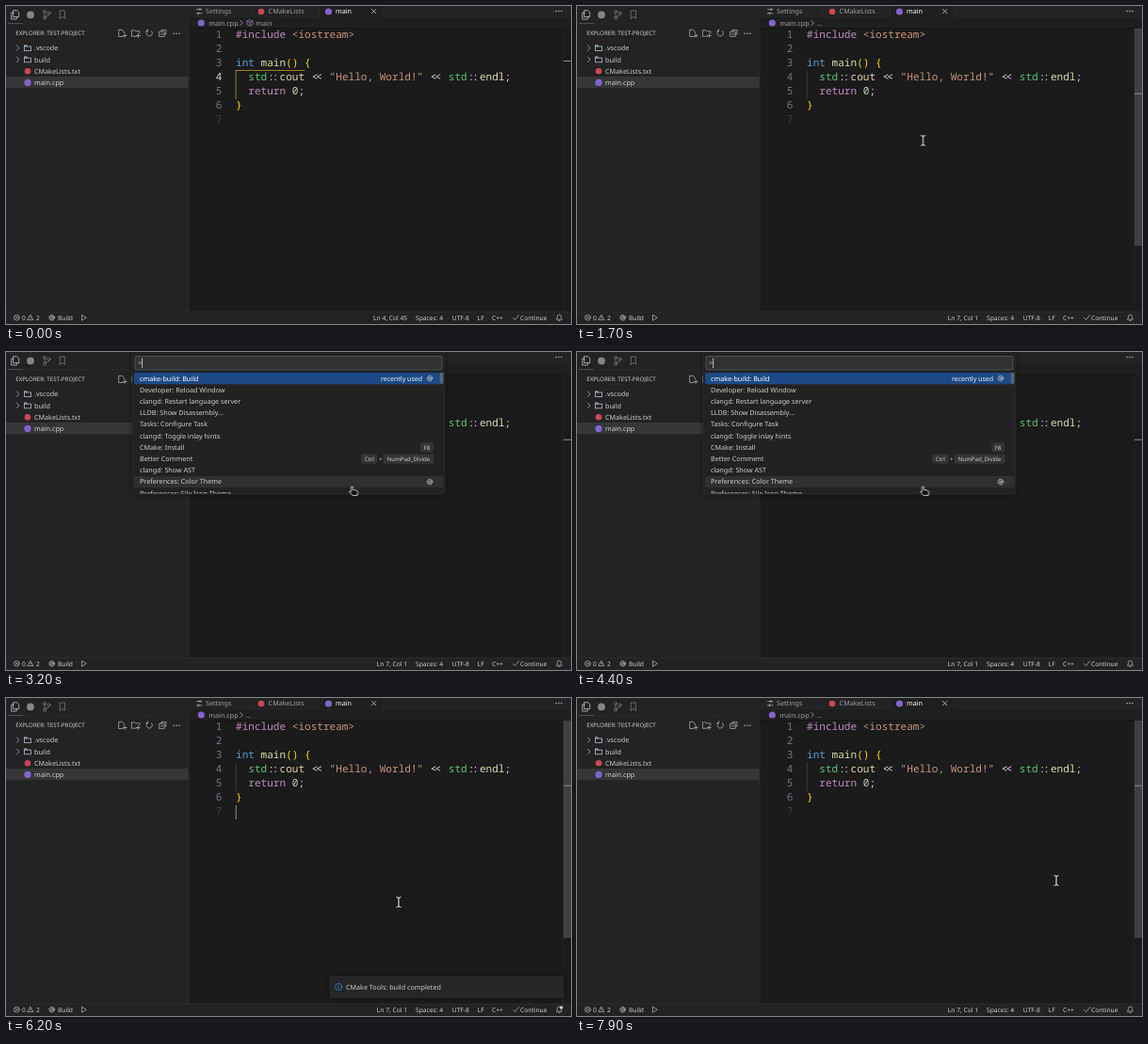
An HTML page that plays this animation: 600x338 px, repeating every 8000 ms.

```html
<!DOCTYPE html>
<html lang="en">
<head>
<meta charset="utf-8">
<title>Code editor</title>
<style>
html, body { margin: 0; width: 100%; height: 100%; overflow: hidden; background: #1b1b1b; }
svg { display: block; width: 100%; height: 100%; }
text { font: 7.2px "Noto Sans", sans-serif; fill: #ccc; text-rendering: geometricPrecision; white-space: pre; }
.status text { font-size: 6.66px; }
.dim, .dim text { fill: #9d9d9d; }
.code text { font: 11.07px "Noto Sans Mono", monospace; fill: #d4d4d4; font-variant-ligatures: none; }
.code .num { fill: #6e7681; }
.code .last { fill: #3c3e41; }
.code .now { fill: #d8d8d8; }
.key { fill: #c586c0; } .str { fill: #ce9178; } .type { fill: #569cd6; } .fn { fill: #dcdcaa; }
.brace { fill: #ffd700; } .ns { fill: #55c46c; } .var { fill: #e6cfa8; } .lit { fill: #b5cea8; }
.op { fill: #e4e4e4; font-weight: 500; }
.line { fill: none; stroke: #c5c5c5; stroke-width: .65; stroke-linecap: round; stroke-linejoin: round; }
.key-cap { fill: #343434; stroke: #3f3f3f; stroke-width: .5; }
.key-text { font-size: 6.1px; }

/* One loop is 8 s, so 1.25% is one 100 ms tick. */
.anim { animation: 8s step-end infinite; }
.before { animation-name: before; }
.after { animation-name: after; }
.caret-end { animation-name: caret-end; }
.caret-new { animation-name: caret-new; }
.caret-input { animation-name: caret-input; }
.palette { animation-name: palette; }
.slider { animation-name: slider; }
.toast { animation-name: toast; }
.tools { animation-name: tools; }
.hover { animation-name: hover; }
.pointer { animation-name: move; }
.beam { animation-name: beam; }
.arrow { animation-name: arrow; }
.hand { animation-name: hand; }

@keyframes before { 0% { opacity: 1 } 15%, 100% { opacity: 0 } }
@keyframes after { 0% { opacity: 0 } 15%, 100% { opacity: 1 } }
@keyframes caret-end { 0% { opacity: 0 } 5% { opacity: 1 } 11.25%, 100% { opacity: 0 } }
@keyframes caret-new {
  0%, 21.25%, 68.75%, 81.25%, 93.75%, 100% { opacity: 0 }
  15%, 62.5%, 75%, 87.5% { opacity: 1 }
}
@keyframes caret-input {
  0%, 33.75%, 47.5%, 100% { opacity: 0 }
  26.25%, 40%, 53.75% { opacity: 1 }
}
@keyframes palette { 0%, 62.5%, 100% { opacity: 0 } 25% { opacity: 1 } }
@keyframes slider {
  0% { opacity: 0 }
  3.75% { opacity: 1 }
  27.5% { opacity: 1; animation-timing-function: steps(8) }
  37.5% { opacity: 0 }
  63.75% { opacity: 0; animation-timing-function: steps(2) }
  66.25% { opacity: 1 }
  83.75% { opacity: 1; animation-timing-function: steps(8) }
  93.75% { opacity: 0 }
  95%, 100% { opacity: 1 }
}
@keyframes toast {
  0% { opacity: 0 }
  65% { opacity: 0; animation-timing-function: steps(2) }
  67.5% { opacity: 1 }
  93.75%, 100% { opacity: 0 }
}
@keyframes tools { 0%, 100% { opacity: 0 } 81.25% { opacity: 1 } }
@keyframes hover { 0%, 100% { opacity: 0 } 86.25% { opacity: 1 } }
@keyframes move {
  0% { transform: translate(480px, 330px) }
  1.25% { transform: translate(480px, 330px); animation-timing-function: steps(8) }
  11.25% { transform: translate(367.5px, 143px) }
  73.75% { transform: translate(367.5px, 143px); animation-timing-function: steps(3) }
  77.5% { transform: translate(417px, 217px); animation-timing-function: steps(3) }
  81.25% { transform: translate(505px, 292px); animation-timing-function: steps(3) }
  85% { transform: translate(580px, 305px) }
  86.25% { transform: translate(582px, 306px) }
  92.5% { transform: translate(582px, 306px); animation-timing-function: steps(5) }
  98.75%, 100% { transform: translate(509px, 194px) }
}
@keyframes beam {
  0%, 25%, 81.25% { opacity: 0 }
  1.25%, 62.5%, 93.75%, 100% { opacity: 1 }
}
@keyframes arrow { 0%, 86.25%, 100% { opacity: 0 } 81.25% { opacity: 1 } }
@keyframes hand { 0%, 62.5%, 93.75%, 100% { opacity: 0 } 25%, 86.25% { opacity: 1 } }
</style>
</head>
<body>
<svg viewBox="0 0 600 338">
  <defs>
    <g id="gear" class="line">
      <circle r="2.3"/><circle r=".9"/>
      <circle r="3" stroke-width=".9" stroke-dasharray="1.1 1.256" stroke-linecap="butt"/>
    </g>
    <path id="chevron" class="line" d="M-1.3-2.6 1.3 0-1.3 2.6"/>
    <path id="close" class="line" style="stroke-width:.8" d="M-2.2-2.2 2.2 2.2M2.2-2.2-2.2 2.2"/>
    <g id="dots" fill="#c5c5c5"><circle cx="-2.9" r=".7"/><circle r=".7"/><circle cx="2.9" r=".7"/></g>
    <path id="folder" fill="#90a0a8" fill-rule="evenodd" d="M-4-3.3h3l1 1.1h4v5.6h-8zM-3-1.2v3.6h6v-3.6z"/>
    <circle id="build-logo" r="3.3" fill="#cf4550"/>
    <circle id="lang-logo" r="3.6" fill="#8462cf"/>
    <filter id="shadow" x="-10%" y="-30%" width="120%" height="160%">
      <feDropShadow dx="0" dy="0" stdDeviation="2.2" flood-color="#000" flood-opacity=".55"/>
    </filter>
    <clipPath id="list-clip"><path d="M134 21h332v129.5H134z"/></clipPath>
  </defs>

  <!-- Side bar -->
  <path fill="#232324" d="M0 0h194v325H0z"/>
  <path fill="#303031" d="M0 18.7h194v.6H0zM193.7 0h.7v325h-.7z"/>
  <path fill="#363638" d="M0 75.1h193.7v12.2H0z"/>
  <path fill="#5c6670" d="M2 18.2h16v.6H2z"/>
  <g class="line">
    <path stroke="#e0e0e0" d="M8 4.7h3.6l2.1 2.1v4.8H8zM8 7H5.7v7h5.6v-2.3"/>
    <g stroke="#8a8a8a">
      <circle cx="41" cy="6" r="1.5"/><circle cx="41" cy="12.8" r="1.5"/><circle cx="45.5" cy="7.6" r="1.5"/>
      <path d="M41 7.5v3.8M45.5 9.1q0 2-4.3 2M57.6 5h4.8v8.4L60 11.2l-2.4 2.2z"/>
    </g>
    <path d="M124.2 32.5h-4.5V25.3h3.6l2 2v1.4M126.2 29.5v4M124.2 31.5h4"/>
    <path d="M138.4 32.2h-5V25.8h3l1 1h4.5v2M140.4 29.5v4M138.4 31.5h4"/>
    <path d="M154.6 26.7a3.2 3.2 0 1 1-4.2-.5M150.5 24.8v1.9h-1.9"/>
    <path d="M165 27v-1.6h5V30h-1.6M163 27.2h5.2v5.2H163zM164.4 29.8h2.4"/>
  </g>
  <circle cx="26" cy="9.4" r="3.9" fill="#868686"/>
  <use href="#dots" x="181" y="29.2"/>
  <text x="10.2" y="31.3" style="font-size:6.2px">EXPLORER: TEST-PROJECT</text>
  <use href="#chevron" x="12.7" y="44.6"/>
  <use href="#chevron" x="12.7" y="56.9"/>
  <use href="#folder" x="23" y="44.6"/>
  <use href="#folder" x="23" y="56.9"/>
  <use href="#build-logo" x="23" y="69.2"/>
  <use href="#lang-logo" x="23" y="81.4"/>
  <text x="30" y="47.2">.vscode</text>
  <text x="30" y="59.5">build</text>
  <text x="30" y="71.8">CMakeLists.txt</text>
  <text x="30" y="84">main.cpp</text>

  <!-- Tabs -->
  <path fill="#232324" d="M194.4 0H600v11.7H194.4z"/>
  <path fill="#303031" d="M194.4 11.2H600v.6H194.4zM260.4 0h.6v11.5h-.6zM332.4 0h.6v11.5h-.6zM399.6 0h.6v11.5h-.6z"/>
  <path fill="#1f1f1f" d="M333 0h66.6v12H333zM194.4 11.8H600V24H194.4z"/>
  <path class="line" stroke="#aaa" d="M202.5 3.6h5.5M202.5 7.8h5.5M206 2.5v2.2M204.4 6.7v2.2"/>
  <use href="#build-logo" x="271" y="6"/>
  <use href="#lang-logo" x="342.5" y="6"/>
  <use href="#close" x="390.6" y="5.6"/>
  <use href="#dots" x="587" y="5.5"/>
  <text class="dim" x="212" y="8.4">Settings</text>
  <text class="dim" x="278.6" y="8.4">CMakeLists</text>
  <text x="350" y="8.4" style="fill:#fff">main</text>

  <!-- Breadcrumb -->
  <use href="#lang-logo" x="207.3" y="18"/>
  <text class="dim" x="215.3" y="20.5">main.cpp</text>
  <use href="#chevron" x="250" y="18"/>
  <g class="anim before">
    <path class="line" style="stroke:#b180d7" d="M259 14.8l3 1.4v3.4l-3 1.5-3-1.5v-3.4zM256 16.2l3 1.4 3-1.4M259 17.6v3.4"/>
    <text class="dim" x="265.3" y="20.5">main</text>
  </g>
  <text class="dim anim after" x="254.5" y="20.5">...</text>
  <path fill="#131313" d="M194.4 23.4H592v.8H194.4z"/>

  <!-- Editor -->
  <g class="code" transform="translate(0 -.3)">
    <g id="numbers"></g>
    <text class="now anim before" x="222.8" y="79.8">4</text>
    <text class="num anim after" x="222.8" y="79.8">4</text>
    <text x="244" y="34.8"><tspan class="key">#include</tspan> <tspan class="str">&lt;iostream&gt;</tspan></text>
    <text x="244" y="64.8"><tspan class="type">int</tspan> <tspan class="fn">main</tspan><tspan class="brace">() {</tspan></text>
    <text x="257.3" y="79.8"><tspan class="ns">std</tspan><tspan dx="1">:</tspan><tspan dx="-2">:</tspan><tspan class="var" dx="1">cout</tspan> <tspan class="op" dx="1">&lt;</tspan><tspan class="op" dx="-2">&lt;</tspan><tspan class="str" dx="1"> "Hello, World!"</tspan> <tspan class="op" dx="1">&lt;</tspan><tspan class="op" dx="-2">&lt;</tspan><tspan class="ns" dx="1"> std</tspan><tspan dx="1">:</tspan><tspan dx="-2">:</tspan><tspan class="fn" dx="1">endl</tspan>;</text>
    <text x="257.3" y="94.8"><tspan class="key">return</tspan> <tspan class="lit">0</tspan>;</text>
    <text x="244" y="109.8"><tspan class="brace">}</tspan></text>
  </g>
  <g class="anim before">
    <path fill="#c9a01c" d="M243.7 68.2H317v.8h-73.3z"/>
    <path fill="#c58f28" d="M243.7 68.2h.8V99h-.8z"/>
  </g>
  <path class="anim after" fill="#57502a" d="M243.8 69h.7v30h-.7z"/>
  <path class="anim caret-end" fill="#9a9a98" d="M536.2 69h.9v15h-.9z"/>
  <path class="anim caret-new" fill="#9a9a98" d="M243.8 114h.9v15h-.9z"/>
  <path fill="#2b2b2b" d="M591.6 24h.5v301h-.5z"/>
  <path class="anim slider" fill="#404040" d="M592 24h8v231h-8z"/>
  <path class="anim before" fill="#8a8a8a" d="M592 58h8v1h-8z"/>
  <path class="anim after" fill="#8a8a8a" d="M592 92.7h8v1h-8z"/>

  <!-- Status bar -->
  <g class="status">
    <path fill="#232324" d="M0 325h600v13H0z"/>
    <path fill="#303031" d="M0 324.8h600v.6H0z"/>
    <g class="line">
      <circle cx="11.4" cy="331.2" r="2.9"/>
      <path d="M10.2 330l2.4 2.4M12.6 330l-2.4 2.4M26 328.4l2.9 5.2h-5.8zM26 330.4v1.5M80.8 328.4l4.5 2.8-4.5 2.8zM538.5 331.6l2 2 4-5"/>
      <path d="M584.6 333.2h5.8l-.8-1.5v-1.5a2.1 2.1 0 0 0-4.2 0v1.5zM586.8 334.4h1.4"/>
    </g>
    <use href="#gear" x="48.7" y="331.2"/>
    <text x="17" y="333.5">0</text>
    <text x="32" y="333.5">2</text>
    <text x="55" y="333.5">Build</text>
    <text class="anim before" x="426" y="333.5" text-anchor="end">Ln 4, Col 45</text>
    <text class="anim after" x="426" y="333.5" text-anchor="end">Ln 7, Col 1</text>
    <text x="435" y="333.5">Spaces: 4</text>
    <text x="473.8" y="333.5">UTF-8</text>
    <text x="500.8" y="333.5">LF</text>
    <text x="516" y="333.5">C++</text>
    <text x="546" y="333.5">Continue</text>
    <circle class="anim toast" cx="589.8" cy="329" r="1.7" fill="#d0d0d0"/>
  </g>

  <!-- Notification -->
  <g class="anim toast">
    <rect x="344" y="295.5" width="248" height="23" rx="1.5" fill="#252526" stroke="#303031" stroke-width=".6" filter="url(#shadow)"/>
    <g class="line" style="stroke:#3794ff">
      <circle cx="353.2" cy="307" r="3.6"/><path d="M353.2 306.6v2.2M353.2 305v.1"/>
    </g>
    <text x="361" y="309.6">CMake Tools: build completed</text>
    <g class="anim tools">
      <rect class="anim hover" x="576.5" y="301" width="12" height="12" rx="2" fill="#3a3b3c"/>
      <use href="#gear" x="553.3" y="307"/>
      <use href="#chevron" transform="translate(568 307) rotate(-90)"/>
      <use href="#close" x="582.4" y="307"/>
    </g>
  </g>

  <!-- Command palette -->
  <g class="anim palette">
    <path fill="#232324" stroke="#333" stroke-width=".6" filter="url(#shadow)" d="M134-4h332v152q0 3-3 3H137q-3 0-3-3z"/>
    <rect x="137" y="4.5" width="326" height="14.5" rx="1" fill="#313131" stroke="#555a62" stroke-width=".8"/>
    <text x="140.2" y="14.4">&gt;</text>
    <path class="anim caret-input" fill="#ddd" d="M144.3 6.5h.8v10.5h-.8z"/>
    <g clip-path="url(#list-clip)">
      <rect x="136" y="22" width="328.5" height="12.2" rx="1" fill="#1c4a86"/>
      <rect x="136" y="131.9" width="328.5" height="12.2" rx="1" fill="#2f3031"/>
      <g id="rows"></g>
      <path fill="#5b6674" d="M460.8 22h3.4v11.5h-3.4z"/>
    </g>
    <text x="442" y="30.5" text-anchor="end" style="font-size:7px;fill:#f0f0f0">recently used</text>
    <use href="#gear" x="450" y="28"/>
    <use href="#gear" x="450" y="138"/>
    <g id="caps"></g>
    <text class="key-text" x="395.9" y="115.8">+</text>
  </g>

  <!-- Mouse pointer -->
  <g class="anim pointer">
    <g class="anim beam" fill="none" stroke-linecap="round">
      <path stroke="#111" stroke-width="2.4" d="M-2.2-5.2Q0-5.2 0-3.8Q0-5.2 2.2-5.2M0-3.8V3.8M-2.2 5.2Q0 5.2 0 3.8Q0 5.2 2.2 5.2"/>
      <path stroke="#eee" stroke-width="1.1" d="M-2.2-5.2Q0-5.2 0-3.8Q0-5.2 2.2-5.2M0-3.8V3.8M-2.2 5.2Q0 5.2 0 3.8Q0 5.2 2.2 5.2"/>
    </g>
    <path class="anim arrow" fill="#111" stroke="#eee" stroke-width=".7" d="M0 0v8.5l2-1.8 1.4 3 1.4-.7-1.3-2.9h2.6z"/>
    <path class="anim hand" fill="#111" stroke="#eee" stroke-width=".8" stroke-linejoin="round"
      d="M-.9.4q.9-1 1.8 0v3.1l4 .7q1.4.4 1.2 2l-.5 3.2H.3L-2.7 6q-.2-1.4 1-1l.8.7z"/>
  </g>
</svg>
<script>
const commands = [
  "cmake-build: Build", "Developer: Reload Window", "clangd: Restart language server",
  "LLDB: Show Disassembly...", "Tasks: Configure Task", "clangd: Toggle inlay hints",
  "CMake: Install", "Better Comment", "clangd: Show AST",
  "Preferences: Color Theme", "Preferences: File Icon Theme"
];
const fill = (id, markup) => { document.getElementById(id).innerHTML = markup; };

fill("rows", commands.map((label, i) =>
  `<text x="142" y="${30.6 + 12.21 * i}"${i ? "" : ' style="fill:#fff"'}>${label}</text>`).join(""));

fill("numbers", [1, 2, 3, 5, 6, 7].map(n =>
  `<text class="num${n === 7 ? " last" : ""}" x="222.8" y="${19.8 + 15 * n}">${n}</text>`).join(""));

const keyCap = (label, x, y, width) =>
  `<rect class="key-cap" x="${x}" y="${y - 4.7}" width="${width}" height="9.4" rx="1.5"/>
   <text class="key-text" x="${x + width / 2}" y="${y + 2.2}" text-anchor="middle">${label}</text>`;
fill("caps", keyCap("F8", 440.5, 101.3, 13) + keyCap("Ctrl", 377.5, 113.6, 16.5) + keyCap("NumPad_Divide", 401, 113.6, 53));
</script>
</body>
</html>
```
